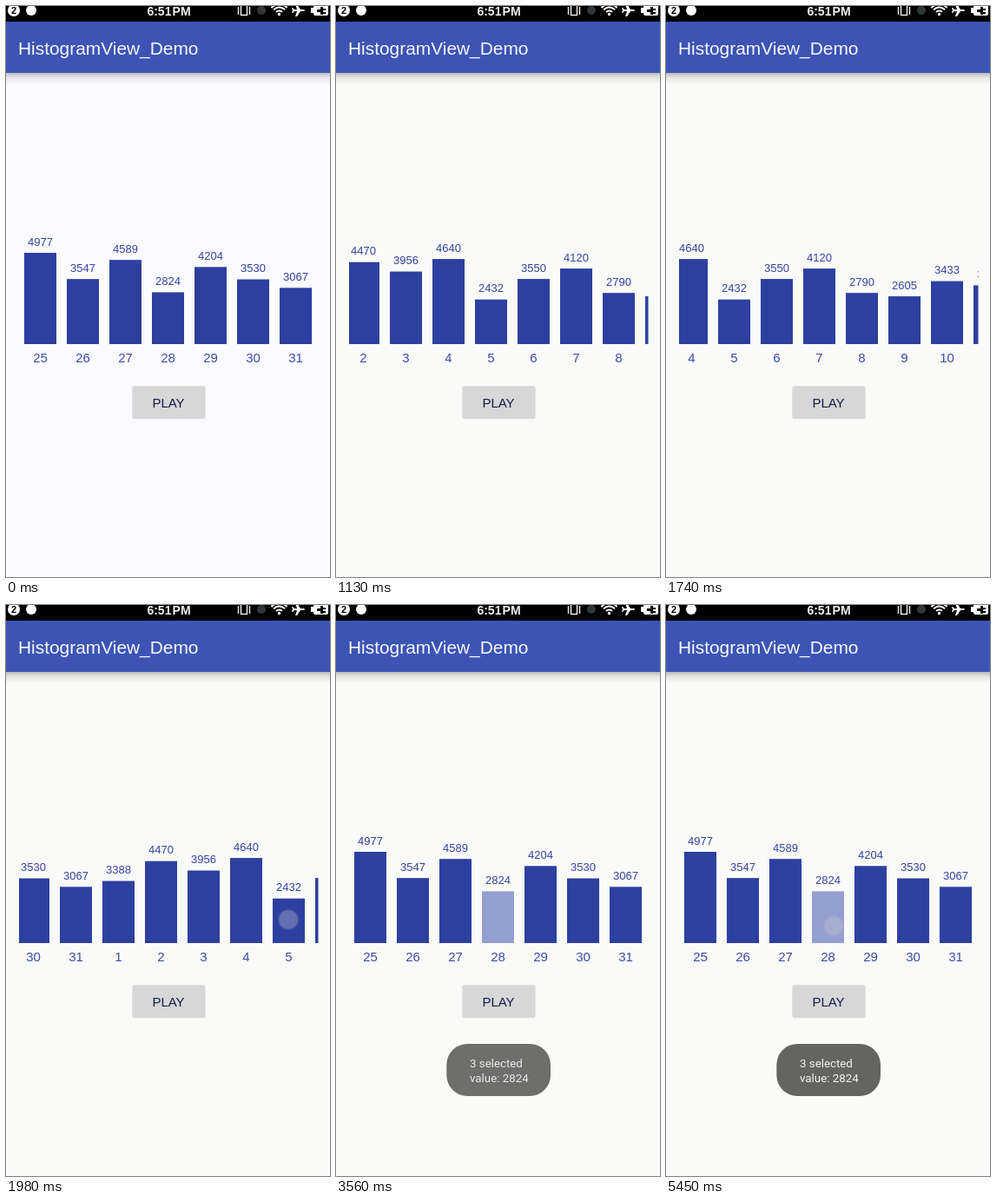
An HTML page with a canvas that plays this animation: 373 by 657 pixels, repeating every 5540 ms.

```html
<!DOCTYPE html>
<html lang="en">
<head>
<meta charset="utf-8">
<title>HistogramView_Demo</title>
<style>
  html, body { margin: 0; width: 100%; height: 100%; overflow: hidden; background: #fafaf9; }
  canvas { display: block; width: 100%; height: 100%; }
</style>
</head>
<body>
<canvas id="stage"></canvas>
<script>
const W = 373, H = 657, LOOP = 5540;
const SANS = '"Liberation Sans", Arial, sans-serif';
const ROBOTO = 'Roboto, sans-serif';

const canvas = document.getElementById('stage');
const ratio = window.devicePixelRatio || 1;
canvas.width = W * ratio;
canvas.height = H * ratio;
const ctx = canvas.getContext('2d');
ctx.scale(ratio, ratio);

const values = [4977, 3547, 4589, 2824, 4204, 3530, 3067, 3388, 4470, 3956, 4640,
                2432, 3550, 4120, 2790, 2605, 3433, 3202, 2960, 4508, 2222, 3815];
const chart = { left: 15, right: 359.5, first: 21, pitch: 49, bar: 37, base: 389, scale: 0.0211 };

// Stretches of screen updates: start, end, number of updates
const updates = [
  [510, 1050, 8], [1130, 1660, 8], [1740, 2220, 7], [2300, 2790, 7], [2870, 3410, 8],
  [3490, 3560, 2], [3710, 3790, 2], [4020, 4260, 4], [4500, 4810, 5], [4960, 5450, 7]
];

// Scroll offset over time: [ms, px]
const scrollKeys = [
  [510, 0], [590, 32], [740, 178], [820, 195], [900, 196], [980, 222], [1130, 400],
  [1205, 441], [1285, 520], [1360, 676], [1433, 733], [1508, 735], [1590, 728],
  [1660, 640], [1740, 500], [1820, 474], [1900, 372], [1980, 253], [2060, 205],
  [2140, 196], [2220, 176], [2300, 98], [2382, 14], [2464, -12], [2545, -4], [2630, 0]
];

// Finger strokes: start ms, end ms, from x, to x, y
const strokes = [
  [510, 730, 300, 130, 362], [930, 1125, 310, 110, 362], [1210, 1360, 320, 90, 362],
  [1570, 1735, 90, 320, 362], [1800, 2050, 104, 325, 362], [2190, 2380, 100, 270, 362],
  [3170, 3480, 188, 188, 369], [4015, 4170, 42, 42, 369], [4495, 4650, 92, 92, 369],
  [4955, 5110, 141, 141, 369], [5280, 5540, 193, 193, 369]
];

// Selections: [ms, bar index]
const selections = [[3250, 3], [4095, 0], [4570, 1], [5040, 2], [5360, 3]];

const clamp = (v, lo = 0, hi = 1) => Math.min(hi, Math.max(lo, v));
const mix = (a, b, k) => a + (b - a) * k;

function lastUpdate(t) {
  let held = 0;
  for (const [start, end, count] of updates) {
    if (t < start) break;
    const step = (end - start) / (count - 1);
    held = start + step * Math.min(count - 1, Math.floor((t - start) / step + 1e-6));
  }
  return held;
}

function valueAt(keys, t) {
  if (t <= keys[0][0]) return keys[0][1];
  for (let i = 1; i < keys.length; i++) {
    const [t0, v0] = keys[i - 1], [t1, v1] = keys[i];
    if (t <= t1) return mix(v0, v1, (t - t0) / (t1 - t0));
  }
  return keys[keys.length - 1][1];
}

function text(str, x, y, font, color, align = 'center') {
  ctx.font = font;
  ctx.fillStyle = color;
  ctx.textAlign = align;
  ctx.fillText(str, x, y);
}

function rect(x, y, w, h, color) {
  ctx.fillStyle = color;
  ctx.fillRect(x, y, w, h);
}

function roundRect(x, y, w, h, r, color) {
  ctx.fillStyle = color;
  ctx.beginPath();
  ctx.roundRect(x, y, w, h, r);
  ctx.fill();
}

function disc(x, y, r, color) {
  ctx.fillStyle = color;
  ctx.beginPath();
  ctx.arc(x, y, r, 0, 7);
  ctx.fill();
}

function path(d, color, x, y) {
  ctx.save();
  ctx.translate(x, y);
  ctx.fillStyle = color;
  ctx.fill(new Path2D(d));
  ctx.restore();
}

function drawStatusBar() {
  rect(0, 0, W, 18, '#000');
  disc(9, 5, 7, '#fff');
  text('2', 9, 9, `bold 11px ${SANS}`, '#000');
  disc(29, 5, 6, '#fff');
  text('6:51\u200aPM', 187.5, 10.5, `bold 14px ${SANS}`, '#f2f2f2');

  ctx.strokeStyle = '#e8e8e8';
  ctx.lineWidth = 1.5;
  ctx.strokeRect(270.5, -1, 7, 11.5);
  for (const x of [267.5, 280.5]) rect(x - 0.7, 1, 1.4, 9, '#e8e8e8');
  disc(294, 5, 5, '#30373b');

  ctx.strokeStyle = '#fff';
  ctx.lineWidth = 2;
  for (const r of [4.5, 8.5, 12]) {
    ctx.beginPath();
    ctx.arc(314.5, 10, r, -Math.PI * 0.77, -Math.PI * 0.23);
    ctx.stroke();
  }
  disc(314.5, 9.5, 1.7, '#fff');

  path('M7 0Q7-1 5-1H2L-2-7H-4L-2-1H-5L-7-3H-8L-7 0L-8 3H-7L-5 1H-2L-4 7H-2L2 1H5Q7 1 7 0Z', '#fff', 337, 5);

  roundRect(354, -1, 17, 12, 2, '#fff');
  rect(351, 2, 3, 6, '#fff');
  path('M-4-1H0V-4H3V-2H6V0H3V2H6V4H3V5H0V2H-4Z', '#000', 362, 5);
}

function drawHeader() {
  const shadow = ctx.createLinearGradient(0, 77, 0, 90);
  shadow.addColorStop(0, 'rgba(0,0,0,.25)');
  shadow.addColorStop(0.4, 'rgba(0,0,0,.09)');
  shadow.addColorStop(1, 'rgba(0,0,0,0)');
  rect(0, 77, W, 13, shadow);
  rect(0, 18, W, 59, '#3d54b4');
  text('HistogramView_Demo', 14, 56, `20.9px ${SANS}`, '#f7f8fd', 'left');
}

function drawChart(scroll, selected) {
  ctx.save();
  ctx.beginPath();
  ctx.rect(chart.left, 200, chart.right - chart.left, 230);
  ctx.clip();
  values.forEach((value, i) => {
    const x = chart.first + i * chart.pitch - scroll;
    if (x < -chart.pitch || x > W) return;
    const height = value * chart.scale;
    const top = chart.base - height;
    const center = x + chart.bar / 2;
    rect(x, top, chart.bar, height, i === selected ? '#959fcf' : '#2d40a0');
    text(value, center, top - 8.3, `13px ${SANS}`, '#3343a0');
    text((24 + i) % 31 + 1, center, 410, `15px ${SANS}`, '#3c4cac');
  });
  ctx.restore();
}

function drawButton() {
  roundRect(145.5, 438, 84, 37.3, 2, 'rgba(0,0,0,.12)');
  roundRect(145.5, 437.3, 83.7, 37, 2, '#d6d7d6');
  text('PLAY', 187, 462, `15px ${SANS}`, '#131c4d');
}

function drawToast(t, selected) {
  const shown = clamp((t - 3170) / 230) * mix(0.93, 1, clamp((t - 3560) / 1200));
  ctx.globalAlpha = shown;
  roundRect(127.3, 505, 119.7, 60, 24, '#646462');
  text(`${selected} selected`, 154, 532, `13.3px ${ROBOTO}`, '#f4f4f4', 'left');
  text(`value: ${values[selected]}`, 154, 549, `13.3px ${ROBOTO}`, '#f4f4f4', 'left');
  ctx.globalAlpha = 1;
}

function drawFinger(t) {
  const stroke = strokes.find(([start, end]) => t >= start && t < end);
  if (!stroke) return;
  const [start, end, from, to, y] = stroke;
  const x = mix(from, to, clamp((t - start) / (end - start) * 1.4));
  disc(x, y, 12, 'rgba(190,190,205,.2)');
  disc(x, y, 10.5, 'rgba(205,205,222,.2)');
}

function draw(time) {
  const t = lastUpdate(time % LOOP);
  const selection = selections.filter(([at]) => t >= at).pop();
  const selected = selection ? selection[1] : -1;
  rect(0, 0, W, H, t < 510 ? '#fbfafe' : '#fafaf9');
  drawHeader();
  drawStatusBar();
  drawChart(valueAt(scrollKeys, t), selected);
  drawButton();
  if (selection) drawToast(t, selected);
  drawFinger(t);
}

let origin;
function frame(now) {
  origin ??= now;
  draw(now - origin);
  requestAnimationFrame(frame);
}
draw(0);
requestAnimationFrame(frame);
</script>
</body>
</html>
```
